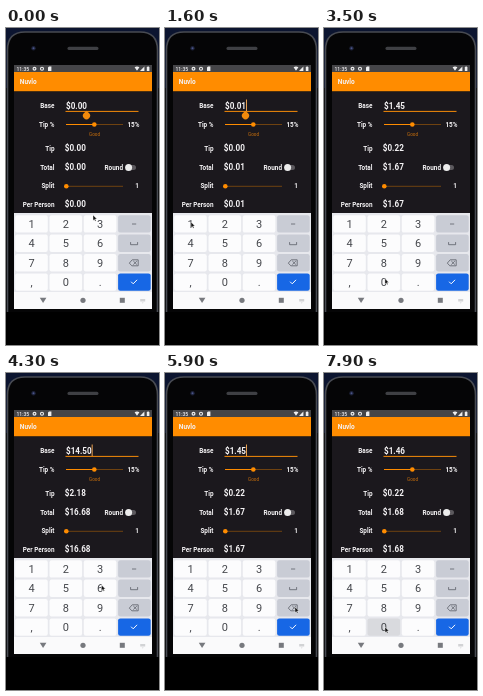
An HTML page for the animation above (8 s loop, 153x317 px).

```html
<!DOCTYPE html>
<html lang="en">
<head>
<meta charset="utf-8">
<title>Tip calculator</title>
<style>
html, body { margin: 0; width: 100%; height: 100%; overflow: hidden; background: #000; }
svg { display: block; width: 153px; height: 317px; }
text { font-family: Roboto, sans-serif; fill: #f4f2f4; }
.label { font-size: 6.4px; font-weight: 700; text-anchor: end; }
.value { font-size: 8.15px; font-weight: 700; }
.key { font-size: 11px; fill: #45474c; text-anchor: middle; }
.line { fill: none; stroke-linecap: round; stroke-linejoin: round; }
</style>
</head>
<body>
<svg viewBox="0 0 153 317">
  <rect width="153" height="317"/>
  <rect width="153" height="60" fill="#0c1530"/>
  <path d="M1.5 284V22Q1.5 4 19 4H134Q151.5 4 151.5 22V284" fill="#050506" stroke="#484b52" stroke-width="1.6"/>
  <rect x="61.5" y="18.8" width="31" height="3.2" rx="1.6" fill="#3f4044"/>
  <circle cx="27.5" cy="20.3" r="2.2" fill="#1d2238"/>
  <circle cx="27.5" cy="20.3" r="1" fill="#4a5488"/>

  <rect x="8" y="37" width="138" height="8" fill="#454548"/>
  <text x="10.5" y="42.6" font-size="5" font-weight="500">11:35</text>
  <circle cx="28.5" cy="40.8" r="1.4" fill="none" stroke="#eee" stroke-width="1.2"/>
  <circle cx="36" cy="40.8" r="1.5" fill="none" stroke="#eee" stroke-width="1.1"/>
  <path d="M42 39.6l1-1h2.4v4.4H42zM128.6 39.2q2.4-1.5 4.8 0L131 42.8zM138.4 38.5v4.4H134zM140.8 39h.8v-.7h1v.7h.8v4h-2.6z" fill="#eee"/>

  <rect x="8" y="44" width="138" height="19.5" fill="#ff8c00"/>
  <text x="13.8" y="56.2" font-size="6.5" font-weight="700">Nuvlo</text>
  <rect x="8" y="63.5" width="138" height="122" fill="#1b181d"/>

  <g id="labels"></g>
  <path d="M59.5 83.4h73" stroke="#f58a08"/>
  <path d="M60 96.5h57M60 158.3h57" stroke="#6f4210"/>
  <path d="M60 96.5h28" stroke="#ff8c00"/>
  <circle cx="88.3" cy="96.5" r="2.3" fill="#ff8c00"/>
  <circle cx="60.3" cy="158.3" r="2.3" fill="#ff8c00"/>
  <text class="label" x="133.5" y="98.8">15%</text>
  <text x="88.5" y="107.5" font-size="4.6" text-anchor="middle" style="fill:#c96f0c">Good</text>
  <text class="label" x="117" y="141.6">Round</text>
  <rect x="120" y="136.9" width="10" height="5" rx="2.5" fill="#5c595e"/>
  <circle cx="122.6" cy="139.4" r="3.5" fill="#ececec"/>
  <text class="label" x="133" y="160.4">1</text>

  <path id="handle" d="M80.5 82.8l2.7 2.5a3.6 3.6 0 1 1-5.4 0z" fill="#f28a0c"/>
  <rect id="caret" y="71.5" width=".9" height="11.5" fill="#ffb056"/>

  <rect x="8" y="185" width="138" height="79" fill="#e7e8ed"/>
  <rect x="8" y="264" width="138" height="17" fill="#fafafb"/>
  <g id="keys"></g>
  <g class="line" stroke="#5b5f67" stroke-width=".8">
    <path d="M126.4 196h3.4M124.6 214.5v2.2h7v-2.2"/>
    <path d="M123.6 234.8l2.6-3h6v6h-6zM127.6 233.3l3 3m0-3l-3 3"/>
    <path d="M125.4 254l1.8 1.8 3.6-3.7" stroke="#fff" stroke-width="1"/>
  </g>
  <g fill="#77797e">
    <path d="M33.8 269.8h6.6l-3.3 5.2z"/>
    <circle cx="77" cy="272.3" r="2.6"/>
    <rect x="113.8" y="269.8" width="5" height="5"/>
    <path d="M134.2 271h5v2.6h-5zM135.7 274.6h2l-1 1z" opacity=".3"/>
  </g>
  <path id="pointer" d="M0 0v5.6l1.3-1.1.9 1.8.9-.5-.9-1.7h1.7z" fill="#111" stroke="#fff" stroke-width=".4"/>
</svg>
<script>
const $ = id => document.getElementById(id);
const add = (parent, tag, attrs, text = '') => {
  const el = document.createElementNS('http://www.w3.org/2000/svg', tag);
  for (const name in attrs) el.setAttribute(name, attrs[name]);
  el.textContent = text;
  return parent.appendChild(el);
};

const values = {};
[['Base', 80.3], ['Tip %', 98.8], ['Tip', 123], ['Total', 141.6], ['Split', 160.4], ['Per Person', 179]]
  .forEach(([name, y]) => {
    add($('labels'), 'text', { class: 'label', x: 48.5, y }, name);
    if (name !== 'Tip %' && name !== 'Split')
      values[name] = add($('labels'), 'text', { class: 'value', x: 58.8, y: y + .4 });
  });
values.Base.setAttribute('x', 60);

const keys = {};
['1', '2', '3', '-', '4', '5', '6', ' ', '7', '8', '9', '<', ',', '0', '.', 'ok'].forEach((name, i) => {
  const x = 9.2 + i % 4 * 34.3, y = 187.2 + (i >> 2) * 19.4;
  const side = i % 4 === 3;
  const fill = name === 'ok' ? '#1767e5' : side ? '#c9ccd5' : '#fcfcfd';
  const rect = add($('keys'), 'rect', { x, y, width: 32.6, height: 17.4, rx: 2.2, fill });
  keys[name] = { rect, fill, held: side ? '#b2b5bf' : '#d9dade' };
  if (!side) add($('keys'), 'text', { class: 'key', x: x + 16.4, y: y + 12.6 }, name);
});

// Key presses: time, key, resulting cents
const presses = [
  [1500, '1', 1], [2300, '4', 14], [2900, '5', 145], [3900, '0', 1450],
  [5500, '<', 145], [6500, '<', 14], [7300, '6', 146], [8000, '0', 1460]
];
// Pointer stops: time, x, y
const path = [
  [0, 87, 187], [200, 86, 187], [1100, 26, 194], [1650, 26, 194], [2050, 27, 212], [2350, 27, 212],
  [2700, 59, 210], [3050, 60, 213], [3600, 61, 254], [4000, 61, 254], [4300, 95.5, 212],
  [4800, 127, 232], [5200, 130, 234], [6600, 130, 234], [6750, 128, 234], [6900, 124, 233],
  [7200, 95, 213], [7400, 95, 213], [7750, 61, 254], [8000, 61, 254]
];
const money = cents => '$' + (cents / 100).toFixed(2);

function pointerAt(t) {
  const i = path.findIndex(p => p[0] > t);
  const [t0, x0, y0] = path[i - 1], [t1, x1, y1] = path[i];
  const u = (t - t0) / (t1 - t0), k = u * u * (3 - 2 * u);
  return [x0 + (x1 - x0) * k, y0 + (y1 - y0) * k];
}

function draw(now) {
  const t = now % 8000;
  const last = presses.filter(p => p[0] <= t).pop() || [-500, '', 0];
  const cents = last[2], total = Math.round(cents * 115 / 100);
  values.Base.textContent = money(cents);
  values.Tip.textContent = money(Math.round(cents * 15 / 100));
  values.Total.textContent = values['Per Person'].textContent = money(total);

  $('caret').setAttribute('x', 60 + values.Base.getComputedTextLength());
  $('caret').style.opacity = (t - last[0]) % 1000 < 500 ? 1 : 0;
  $('handle').style.opacity = t < 1700 ? 1 : 0;

  for (const name in keys) {
    const { rect, fill, held } = keys[name];
    const down = presses.some(p => p[1] === name && t >= p[0] - 150 && t < p[0] + 50);
    rect.setAttribute('fill', down ? held : fill);
  }
  $('pointer').setAttribute('transform', `translate(${pointerAt(t)})`);
}

const start = performance.now();
function tick() {
  draw(performance.now() - start);
  requestAnimationFrame(tick);
}
tick();
</script>
</body>
</html>
```
